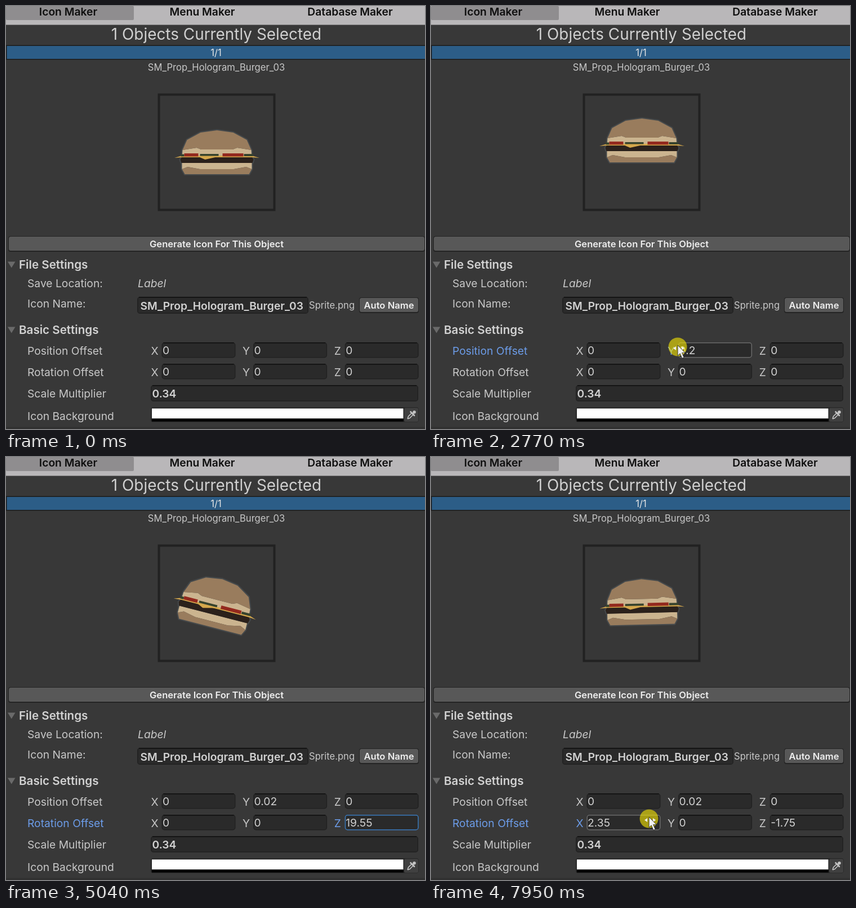
An HTML page for the animation above (8000 ms loop, 744 by 752 pixels).

```html
<!DOCTYPE html>
<html lang="en">
<head>
<meta charset="utf-8">
<title>Icon Maker</title>
<style>
  html, body { margin: 0; width: 100%; height: 100%; overflow: hidden; background: #383838; }
  svg { display: block; width: 744px; height: 752px; }
  text {
    font-family: Inter, "Noto Sans", sans-serif;
    font-optical-sizing: none;
    white-space: pre;
  }
</style>
</head>
<body>
<svg id="stage" viewBox="0 0 744 752" xmlns="http://www.w3.org/2000/svg"></svg>
<script>
const LOOP = 8000, TICK = 66.85, PHASE = 1630;
const TEXT = '#c8c8c8', LIGHT = '#d2d2d2', BLUE = '#6c9ce8', FOCUS = '#3a79bb', HOVER = '#6a6a6a', EDGE = '#212121';
const SMALL = 16.6, BODY = 19.25, HEAD = 20.6, TITLE = 27.9;
const stage = document.getElementById('stage');

function add(tag, attrs, parent = stage) {
  const el = document.createElementNS('http://www.w3.org/2000/svg', tag);
  for (const k in attrs) el.setAttribute(k, attrs[k]);
  parent.appendChild(el);
  return el;
}
const rect = (x, y, width, height, fill, more) =>
  add('rect', { x, y, width, height, fill, ...more });
function text(str, x, y, size = BODY, more) {
  const el = add('text', { x, y, 'font-size': size, fill: TEXT, ...more });
  el.textContent = str;
  return el;
}
const bold = { 'font-weight': 600 };
const mid = { 'text-anchor': 'middle' };

// Sunken input box
function field(x, y, w, h) {
  const box = rect(x + .75, y + .75, w - 1.5, h - 1.5, '#2a2a2a', { rx: 4, stroke: EDGE, 'stroke-width': 1.5 });
  const top = rect(x + 3, y, w - 6, 1.5, '#0f0f0f');
  return { x, y, w, h, box, top };
}
function button(x, y, w, h, label) {
  rect(x, y, w, h + 1, '#242424', { rx: 4 });
  rect(x + 1, y + 1, w - 2, h - 2, '#585858', { rx: 3.5 });
  text(label, x + w / 2, y + 19.7, SMALL, { ...bold, ...mid, fill: '#eeeeee' });
}
function section(label, y) {
  add('path', { d: `M3 ${y - 12.5}h13.5l-6.75 11z`, fill: '#6a6a6a' });
  text(label, 23, y, HEAD, { ...bold, fill: LIGHT });
}

// Tabs and header
rect(0, 0, 744, 33.5, '#b9b7b9');
rect(0, 0, 227, 25, '#8f8d8f', { rx: 2 });
[['Icon Maker', 110.5], ['Menu Maker', 348.5], ['Database Maker', 611]].forEach(([s, x]) =>
  text(s, x, 17, BODY, { ...bold, ...mid, fill: '#0e0e0e' }));
text('1 Objects Currently Selected', 373.5, 60, TITLE, { ...mid, fill: '#d0d0d0' });
rect(0, 69.5, 744, 26, '#1b1b1b');
rect(1.5, 71, 743, 23, '#2c5d87');
text('1/1', 373, 88.5, SMALL, { ...mid, fill: '#e6e6e6' });
text('SM_Prop_Hologram_Burger_03', 373.5, 114.5, SMALL, mid);
rect(271.5, 157.5, 205, 205, '#373737', { stroke: EDGE, 'stroke-width': 4 });

// Burger, drawn around its centre
const BUN = '#997c5d', CRUMB = '#cbb48f', MEAT = '#2b211b', CHEESE = '#d5a84c', TOMATO = '#93291e', PICKLE = '#36432d';
const burger = add('g', {});
const rim = add('path', { fill: '#45494b', stroke: '#45494b', 'stroke-width': 4, 'stroke-linejoin': 'round' }, burger);

// Closes a right-hand profile with its mirror image
function mirror(fill, ...pts) {
  const left = pts.map(([x, y]) => [-x, y]).reverse();
  const d = 'M' + [...pts, ...left].join('L') + 'Z';
  add('path', { d, fill }, burger);
  return d;
}
const slab = (fill, x0, x1, y, height) =>
  add('rect', { x: x0, y, width: x1 - x0, height, fill }, burger);

const body = [
  mirror(CRUMB, [62, 14], [62, 25], [52, 21], [30, 25]),
  mirror(BUN, [30, 25], [52, 21], [62, 25], [57, 34]),
  mirror(CRUMB, [28, -10], [36, -13], [61, -9], [62, 3]),
  mirror(BUN, [0, -44], [29, -40], [53, -27], [61, -9], [36, -13], [28, -10]),
  mirror(MEAT, [62, 3], [65, 8], [63, 14])
];
rim.setAttribute('d', body.join(''));
mirror(CHEESE, [62, 1], [75.5, 5], [62, 4]);
add('path', { d: 'M-35 2H6L-21 8Z', fill: CHEESE }, burger);
slab(PICKLE, -64, -58, -1.5, 4);
slab(PICKLE, -30, 3, -2, 3.5);
slab(PICKLE, 48, 64, -2, 4);
slab(TOMATO, -58, -33, -3, 5.5);
slab(TOMATO, 10, 47, -3, 5.5);

function poseBurger(lift, rx, rz) {
  const tall = 1 + Math.abs(rz) * .006 + rx * .01;
  burger.setAttribute('transform',
    `translate(${374.5 - rz * .13} ${265 - 104 * lift + rz * .1}) rotate(${rz * .74}) scale(1 ${tall})`);
}

// Settings
button(4, 409, 740, 27, 'Generate Icon For This Object');
section('File Settings', 467);
text('Save Location:', 38, 500);
text('Label', 234, 500, BODY, { 'font-style': 'italic' });
text('Icon Name:', 38, 535.5);
field(233, 517, 304, 30);
text('SM_Prop_Hologram_Burger_03', 238.5, 540, BODY, { ...bold, fill: LIGHT });
text('Sprite.png', 538, 537.5, SMALL);
button(627, 518, 106, 27, 'Auto Name');

section('Basic Settings', 583);
const COL = 162.6;
const rows = ['Position Offset', 'Rotation Offset'].map((name, r) => {
  const y = 598 + 38 * r;
  return {
    name: text(name, 38, y + 22),
    cells: [...'XYZ'].map((axis, i) => {
      const x = 276.5 + COL * i;
      return {
        tag: text(axis, x - 19, y + 21.5),
        ...field(x, y, 131, 27.5),
        value: text('0', x + 1.5, y + 20.5, BODY, { fill: LIGHT })
      };
    })
  };
});
text('Scale Multiplier', 38, 696);
const scale = field(257, 674, 475, 29);
text('0.34', 259.5, 696, BODY, { ...bold, fill: LIGHT });
text('Icon Background', 38, 736);
rect(257.5, 713.5, 475, 26, EDGE, { rx: 3 });
rect(259, 715.5, 446.5, 18, '#ffffff');
rect(259, 733.5, 446.5, 5, '#000000');
rect(707, 714.5, 25, 24.5, '#404040', { rx: 2 });
add('path', { d: 'M713 734l1.5-4.5 6-6M713 734l4-1.5 6-6', fill: 'none', stroke: '#c4c4c4', 'stroke-width': 1.6 });
add('path', { d: 'M718.5 721.5l6.5 6.5M722 725l3-3', stroke: '#c4c4c4', 'stroke-width': 2.6, 'stroke-linecap': 'round' });
add('circle', { cx: 725, cy: 722, r: 2.8, fill: '#c4c4c4' });
rect(0, 748.5, 744, 3.5, '#303030');

// Pointer, with its tip at the origin
const pointer = add('g', {});
const halo = add('circle', { cx: 0, cy: 3, r: 16.5, fill: '#ffee00' }, pointer);
const arrows = add('path', { d: 'M-8 5.5l5-3.5v7zM12 5.5l-5-3.5v7z', fill: '#f2f2f2' }, pointer);
add('path', {
  d: 'M0 0V18.5L4.2 14.8 7.8 23.2 11 21.8 7.5 13.6H13.2Z',
  fill: '#f2f2f2', stroke: '#222222', 'stroke-width': .8
}, pointer);

const within = (t, a, b) => t >= a && t < b;
const inside = (f, x, y) => within(x, f.x, f.x + f.w) && within(y, f.y, f.y + f.h);
const snap = (v, n) => String(+(Math.round(v * n) / n || 0).toFixed(2));

// Eases from one value to the next: each move is [begin, end, goal]
function ride(t, value, ...moves) {
  for (const [a, b, goal] of moves) {
    const p = Math.min(1, Math.max(0, (t - a) / (b - a)));
    value += (goal - value) * p * p * (3 - 2 * p);
  }
  return value;
}
const liftAt = t => ride(t, 0, [1480, 1805, .41], [1960, 2440, -.3], [2440, 2830, .24], [3060, 3230, .02]);
const spinX = t => ride(t, 0, [7430, 7900, 2.35]);
const spinZ = t => ride(t, 0, [4060, 4760, 21], [4944, 5560, -1.75]);

// Free pointer travel; drags push it sideways with the dragged value
const handX = t => ride(t, 470, [380, 1220, 427], [3436, 3640, 602], [3840, 3900, 597],
  [6180, 6240, 514], [6260, 6860, 262], [7430, 7900, 386]) + 55 * liftAt(t) + 7.5 * Math.max(0, spinZ(t));
const handY = t => ride(t, 758, [380, 1220, 603], [3436, 3640, 655], [4060, 4200, 650],
  [6260, 6560, 570], [6560, 6860, 652], [7430, 7900, 640]);

function outline(f, color) {
  f.box.setAttribute('stroke', color || EDGE);
  f.top.setAttribute('visibility', color ? 'hidden' : 'visible');
}

function render(t) {
  const q = PHASE + Math.floor((t - PHASE) / TICK) * TICK;
  const x = handX(q), y = handY(q), lift = liftAt(q), rx = spinX(q), rz = spinZ(q);
  const drag = within(t, 1290, 3436) || within(t, 4100, 5600) || t >= 7470;
  const [row, col] = t < 1290 ? [-1, -1] : t < 4100 ? [0, 1] : t < 7470 ? [1, 2] : [1, 0];

  rows.forEach(({ name, cells }, r) => {
    name.setAttribute('fill', r === row ? BLUE : TEXT);
    cells.forEach((c, i) => {
      const on = r === row && i === col;
      const lit = drag ? on : inside(c, x, y) || (on && within(t, 3436, 3500));
      c.tag.setAttribute('fill', on ? BLUE : TEXT);
      outline(c, on && i === 2 ? FOCUS : lit ? HOVER : null);
    });
  });
  outline(scale, !drag && inside(scale, x, y) ? HOVER : null);

  rows[0].cells[1].value.textContent = snap(lift, 50);
  rows[1].cells[0].value.textContent = snap(rx, 20);
  rows[1].cells[2].value.textContent = snap(rz, 20);
  poseBurger(lift, rx, rz);

  const overTag = within(y, 598, 664) && rows[0].cells.some(c => within(x, c.x - 21, c.x));
  pointer.setAttribute('transform', `translate(${x.toFixed(2)} ${y.toFixed(2)})`);
  pointer.setAttribute('visibility', y > 754 || x > 742 ? 'hidden' : 'visible');
  halo.setAttribute('fill-opacity', drag ? .58 : 0);
  arrows.setAttribute('fill-opacity', drag || overTag ? 1 : 0);
}

const start = performance.now();
function loop() {
  render((performance.now() - start) % LOOP);
  requestAnimationFrame(loop);
}
render(0);
requestAnimationFrame(loop);
</script>
</body>
</html>
```
